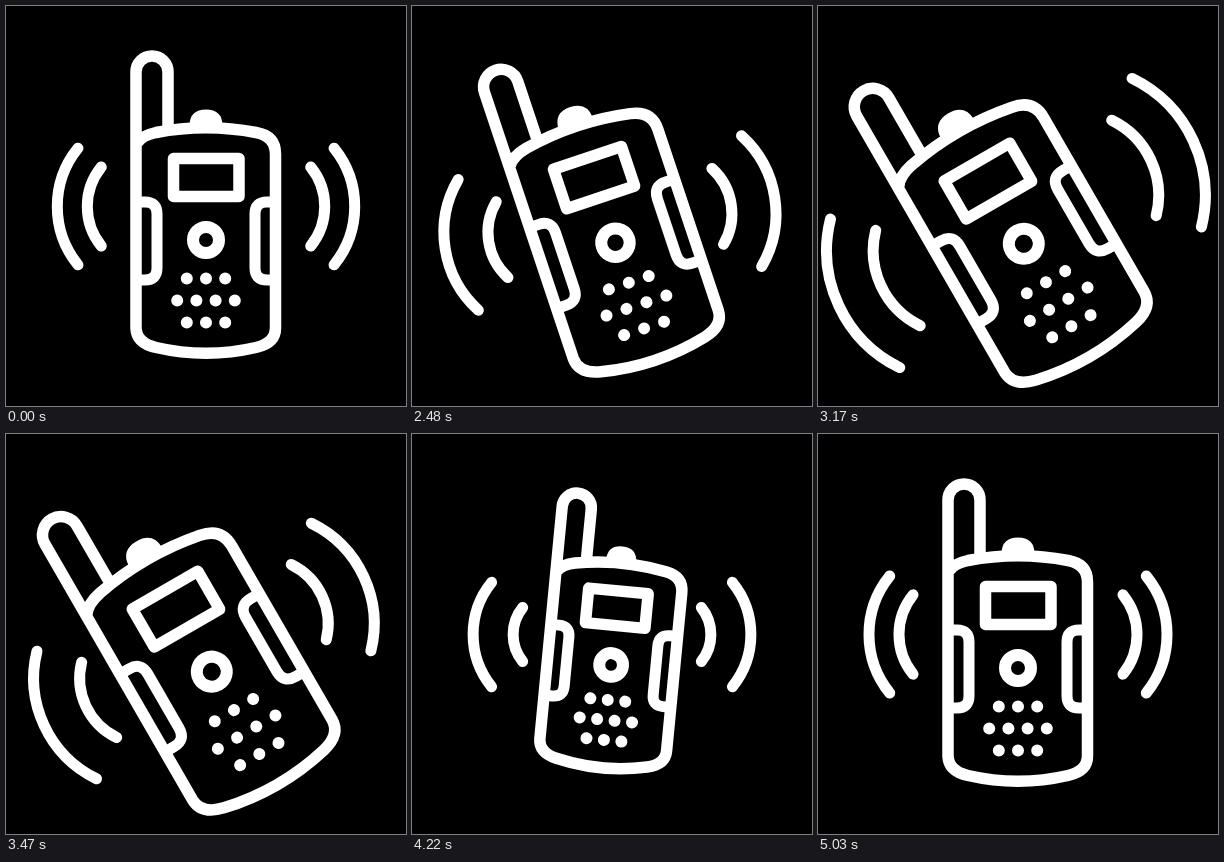
An HTML page that plays this animation: 400x400 px, repeating every 5060 ms.

```html
<!DOCTYPE html>
<html>
<head>
<meta charset="utf-8">
<style>
html, body { margin: 0; height: 100%; overflow: hidden; background: #000; }
svg { display: block; width: 100vw; height: 100vh; }
#radio * { vector-effect: non-scaling-stroke; }
</style>
</head>
<body>
<svg viewBox="0 0 400 400" fill="none" stroke="#fff" stroke-width="11.5" stroke-linecap="round" stroke-linejoin="round">
  <path id="waves" stroke-width="11"/>
  <g id="radio">
    <path d="M162 124V66a16 16 0 0 0-32 0V322Q130.5 337 150 341.5Q200 353 250 341.5Q269.5 337 269.5 322V148Q269.5 130 250 126.5Q200 117 150 126.5Q136 129.5 131 137"/>
    <path d="M183.5 119Q184 103.5 200 103.5Q216 103.5 216.5 119Z" fill="#fff" stroke="none"/>
    <path d="M167.5 152.5H233V190.5H167.5Z"/>
    <path d="M131 196h8q12 0 12 12v54q0 12-12 12h-8M269 196h-8q-12 0-12 12v54q0 12 12 12h8" stroke-width="11"/>
    <circle cx="200" cy="234" r="13" stroke-width="12"/>
    <path id="dots" stroke-width="12"/>
  </g>
</svg>
<script>
const LOOP = 5060, START = 2030;
const $ = id => document.getElementById(id);

function clamp01(u) {
  return Math.min(1, Math.max(0, u));
}

// Smooth step from 0 to 1 between two times
function ramp(t, from, to) {
  const u = clamp01((t - from) / (to - from));
  return u * u * (3 - 2 * u);
}

function dotRow(y, n) {
  let d = '';
  for (let i = 0; i < n; i++) d += `M${200 + (i - (n - 1) / 2) * 19.2} ${y}h.01`;
  return d;
}
$('dots').setAttribute('d', dotRow(272.5, 3) + dotRow(294.5, 4) + dotRow(316.5, 3));

// A mirrored pair of arcs of radius r
function wavePair(r) {
  const half = 39 * Math.PI / 180;
  const x = 56 + r * Math.cos(half), y = r * Math.sin(half);
  return `M${-x} ${-y}A${r} ${r} 0 0 0 ${-x} ${y}M${x} ${-y}A${r} ${r} 0 0 1 ${x} ${y}`;
}

// Lean left and grow, swing back past upright while shrinking, then settle
function drawRadio(t) {
  const rise = ramp(t, START, 2811), settle = ramp(t, 4297, 4850);
  const tilt = 30 * rise - 36.5 * ramp(t, 3531, 4297) + 6.5 * settle;
  const zoom = 1 + 0.155 * rise - 0.245 * ramp(t, 3430, 4270) + 0.09 * settle;
  $('radio').setAttribute('transform',
    `translate(200 200) scale(${zoom}) rotate(${-tilt} 0 24) translate(-200 -200)`);
}

// Evenly spaced pulses travel outwards; only those within a range of radii show
function drawWaves(t) {
  const tilt = 25 * (ramp(t, START, 3160) - ramp(t, 3600, 4220));
  const zoom = 1 + 0.165 * (ramp(t, START, 2811) - ramp(t, 3300, 4220));
  const drop = 16.5 * (ramp(t, START, 2480) - ramp(t, 3740, 4230));
  const gap = 30 + 10 * (ramp(t, START, 2480) - ramp(t, 4220, 4780));
  const lead = (62.7 + 230.3 * clamp01((t - START) / 2750) ** 1.08) % 200;
  let d = '';
  for (let i = -4; i < 4; i++) {
    const r = lead + i * gap;
    if (r > 41.7 && r < 114) d += wavePair(r * 1);
  }
  $('waves').setAttribute('d', d);
  $('waves').setAttribute('stroke-width', 11 / zoom);
  $('waves').setAttribute('transform',
    `translate(${200 - drop / 8} ${200.5 + drop}) rotate(${-tilt}) scale(${zoom})`);
}

const start = performance.now();
function tick() {
  const t = (performance.now() - start) % LOOP;
  drawRadio(t);
  drawWaves(t);
  requestAnimationFrame(tick);
}
tick();
</script>
</body>
</html>
```
